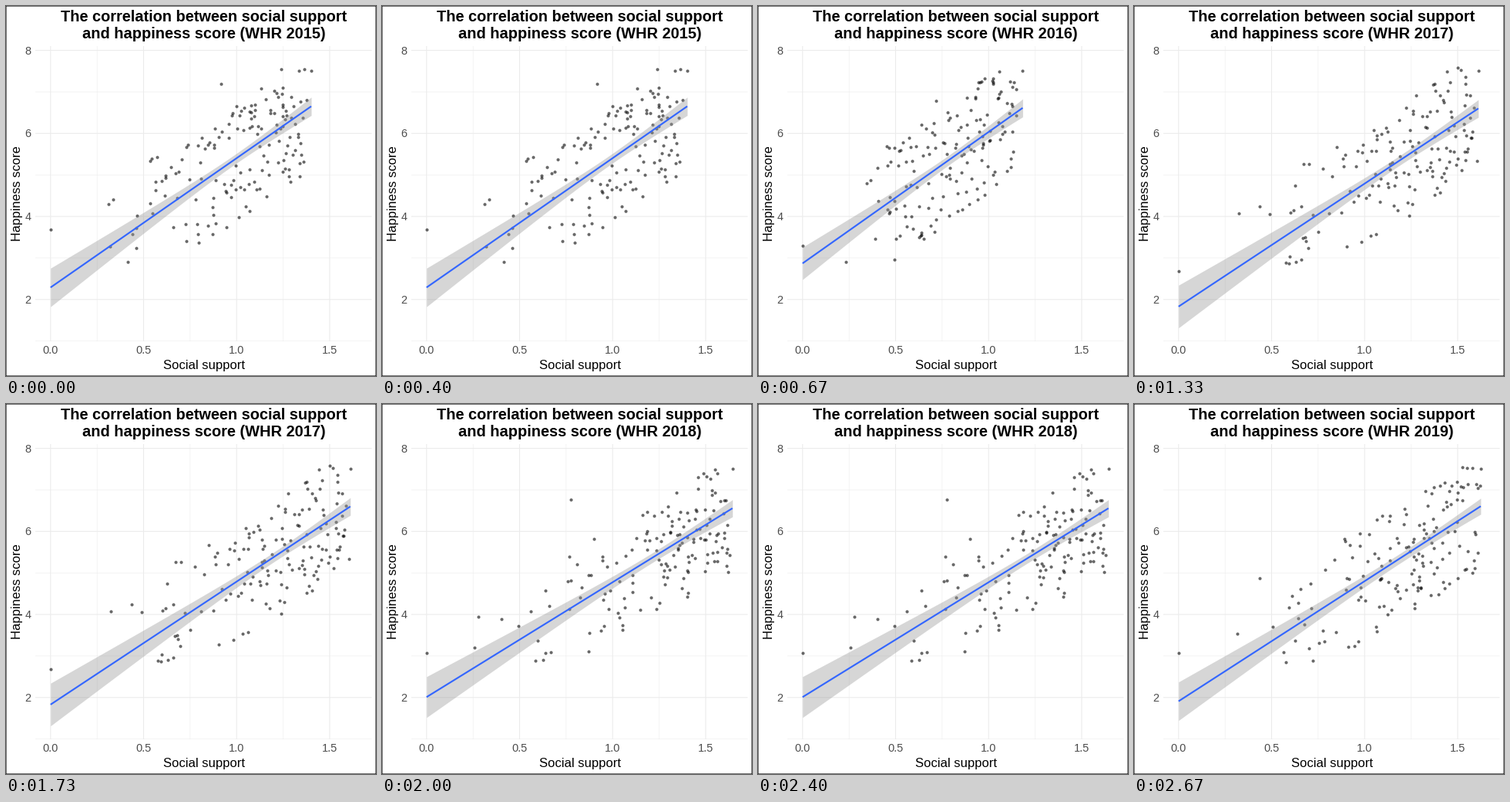
A matplotlib script for the animation above (3.33 s loop, 480 by 480 pixels).

```python
import matplotlib.pyplot as plt
import numpy as np
from matplotlib.animation import FuncAnimation
from matplotlib.collections import LineCollection
from matplotlib.patches import Rectangle

SIZE, DPI = 480, 100
PX = 72 / DPI  # points per pixel
LEFT, RIGHT, TOP, BOTTOM = 38, 474.5, 52, 435
GRID, TICK, BLUE = "#EBEBEB", "#4D4D4D", "#3366FF"
COUNTRIES = 155

# Intercept, slope, largest x, mean x, half width of the band at x = 0
FITS = {
    2015: (2.29, 3.114, 1.401, 0.99, 0.464),
    2016: (2.87, 3.165, 1.183, 0.794, 0.39),
    2017: (1.83, 2.961, 1.611, 1.189, 0.514),
    2018: (2.01, 2.766, 1.644, 1.213, 0.492),
    2019: (1.91, 2.892, 1.624, 1.209, 0.464),
}

# The country at zero, one far above its neighbours and one far below
STANDOUTS = {
    2015: [(0, 3.68), (0.915, 7.19), (0.415, 2.90)],
    2016: [(0, 3.30), (0.717, 6.78), (0.234, 2.91)],
    2017: [(0, 2.69), (0.671, 5.27), (0.63, 2.91)],
    2018: [(0, 3.08), (0.775, 6.77), (0.627, 2.91)],
    2019: [(0, 3.08), (0.437, 4.88), (0.576, 2.85)],
}


def to_x(v):
    return 57.8 + 241.4 * v


def to_y(v):
    return 488.5 - 53.87 * v


def make_points(year):
    start, slope, x_max, mean, _ = FITS[year]
    rng = np.random.default_rng(year)
    known = np.array(STANDOUTS[year] + [(x_max, 7.5)])
    share = mean / x_max
    x = x_max * rng.beta(4.6 * share, 4.6 * (1 - share), COUNTRIES - len(known))
    fit = start + slope * x
    y = rng.uniform(np.maximum(fit - 1.5, 2.85), np.minimum(fit + 1.4, 7.6))
    return np.vstack([known, np.column_stack([x, y])])


def label(x, y, text, size, **style):
    style = {"ha": "center", "va": "baseline", "family": "Liberation Sans", **style}
    return ax.text(x, y, text, fontsize=size * PX, zorder=5, **style)


def grid(xs, ys, width):
    lines = [[(to_x(v), TOP), (to_x(v), BOTTOM)] for v in xs]
    lines += [[(LEFT, to_y(v)), (RIGHT, to_y(v))] for v in ys]
    ax.add_collection(LineCollection(lines, colors=GRID, linewidths=width * PX,
                                     capstyle="butt", snap=False, zorder=1))


def year_layer(year):
    start, slope, x_max, mean, half = FITS[year]
    px, py = make_points(year).T
    dots = ax.scatter(to_x(px), to_y(py), s=(3.2 * PX) ** 2, c="black",
                      alpha=0.5, linewidths=0.95 * PX, zorder=2)
    x = np.linspace(0, x_max, 80)
    fit = start + slope * x
    waist = 0.117
    spread = np.hypot(waist, np.sqrt(half**2 - waist**2) * (x / mean - 1))
    band = ax.fill_between(to_x(x), to_y(fit - spread), to_y(fit + spread),
                           color="#999999", alpha=0.4, linewidth=0, zorder=3)
    line, = ax.plot(to_x(x), to_y(fit), color=BLUE, lw=2.13 * PX,
                    solid_capstyle="butt", zorder=4)
    return dots, band, line


fig = plt.figure(figsize=(SIZE / DPI, SIZE / DPI), dpi=DPI, facecolor="white")
ax = fig.add_axes([0, 0, 1, 1])
ax.set(xlim=(0, SIZE), ylim=(SIZE, 0), autoscale_on=False)
ax.axis("off")

x_ticks, y_ticks = np.arange(0, 2, 0.5), range(2, 9, 2)
grid(x_ticks[:-1] + 0.25, range(1, 8, 2), 0.53)
grid(x_ticks, y_ticks, 1.07)
ax.add_patch(Rectangle((0, 0), SIZE, SIZE, fill=False, ec="black",
                       lw=1.07 * PX, snap=False, zorder=6))

for v in x_ticks:
    label(to_x(v), 451, f"{v:.1f}", 14.5, color=TICK)
for v in y_ticks:
    label(32.5, to_y(v) + 5.2, str(v), 14.5, color=TICK, ha="right")
label(256.5, 471, "Social support", 16.6)
label(22, 243.5, "Happiness score", 16.5, rotation=90, ha="right", va="center")
label(256.5, 20, "The correlation between social support", 20, weight="bold")
title = label(256.5, 42, "", 20, weight="bold")

years = list(FITS)
layers = [year_layer(year) for year in years]


def update(frame):
    current = sum(frame >= round(200 * k / 3) for k in range(1, len(years)))
    for i, layer in enumerate(layers):
        for artist in layer:
            artist.set_visible(i == current)
    title.set_text(f"and happiness score (WHR {years[current]})")
    return [title, *(artist for layer in layers for artist in layer)]


anim = FuncAnimation(fig, update, frames=333, interval=10, repeat=True, repeat_delay=0)
plt.show()
```
